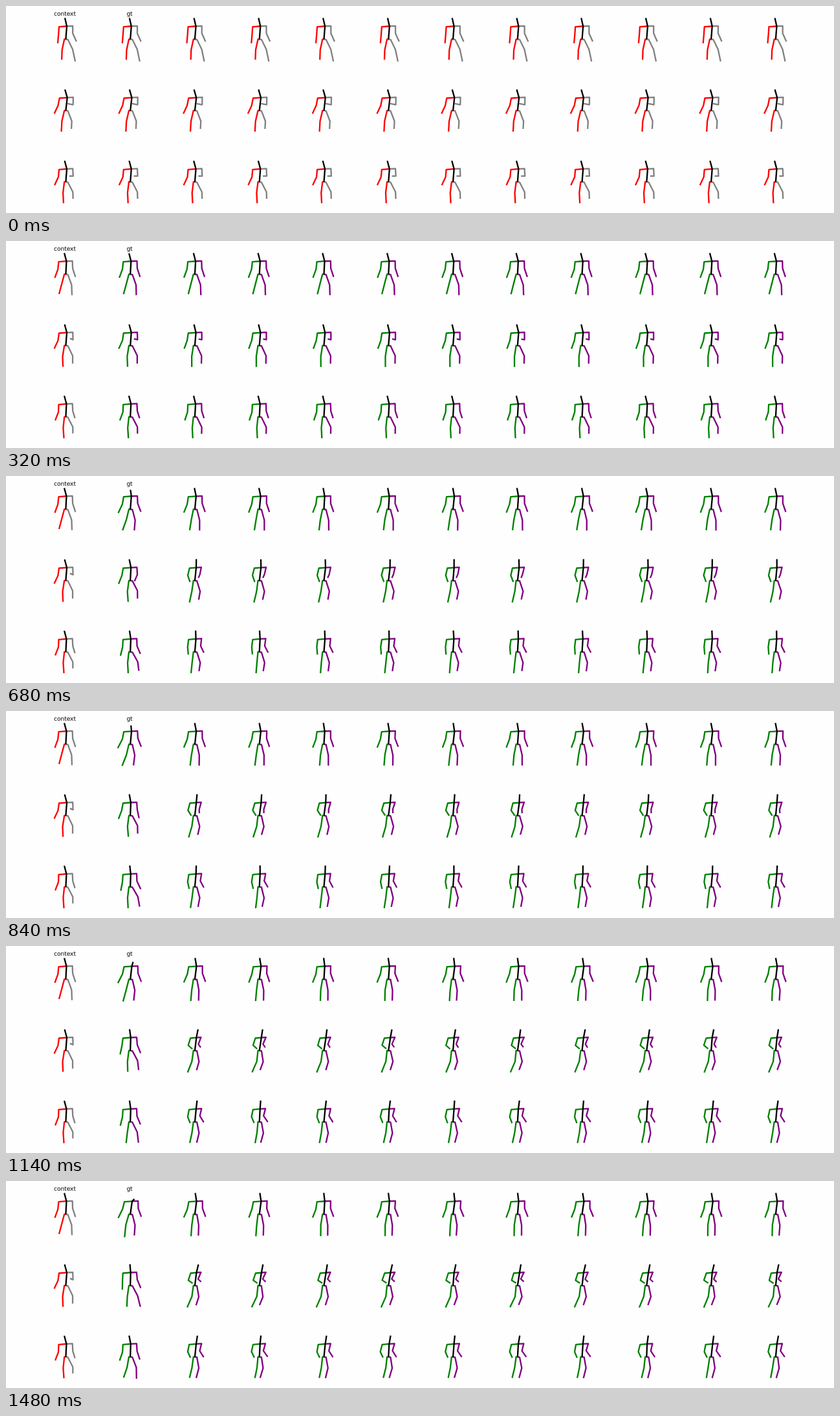
Recreate the animation shown at these times as an HTML page with a canvas. Size 1280 by 320 pixels, loop 1500 ms.

```html
<!DOCTYPE html>
<html lang="en">
<head>
<meta charset="utf-8">
<title>Motion prediction</title>
<style>
  html, body { margin: 0; overflow: hidden; background: #fefefe; }
  canvas { display: block; }
</style>
</head>
<body>
<canvas id="stage" width="1280" height="320"></canvas>
<script>
const LOOP = 1500, STEP = 20, LAST_SEEN = 280, END = LOOP - STEP;
const COLUMNS = 12, PITCH_X = 99.77, PITCH_Y = 110.3;
const BONE = { spine: 20.3, head: 13, arm: [11.5, 14], leg: [17, 16] };

// A pose has a spine [torso, head, head reach, shoulder width] and limbs [upper, lower, lower reach].
// Angles are in degrees from the vertical, positive to the right; reach and width default to 1.
const pose = (spine, armL, armR, legL, legR) => [spine, armL, armR, legL, legR];

const rows = [
  {
    seen: [
      pose([4.5, -13], [-4, -5], [0, 24], [-12, -2, .94], [26, 12, 1.2]),
      pose([3, -15], [-6, -20], [2, 18], [-15, -15, .92], [20, 2])
    ],
    truth: [
      pose([5.5, -5, .66], [-11, -28, 1.13], [3, 22], [-13, -22, 1.14], [12, -8]),
      pose([8, 45, .38], [-14, -26, 1.1], [1, 20], [-16, -6, 1.2], [14, -4])
    ],
    guess: [pose([6, -8], [-10, -21], [-2, 20], [-9, -2, 1.07], [10, -2])]
  },
  {
    seen: [
      pose([6.5, -16], [-11, -25], [-1, -101, .63], [-13, -3], [21, -3, .75]),
      pose([4.5, -15], [-8, -25], [2, -113, .36], [-9, 2], [26, 0, .75])
    ],
    truth: [
      pose([2, -10], [-11, -20], [4, 21], [-7, 5], [28, 1, .78]),
      pose([1.5, -5], [-3, -1], [5, 23], [-8, -3], [28, 14, 1.12])
    ],
    guess: [pose([6.7, 11, 1, .75], [-17, 56, .58], [-24, 47, .45], [-7, -24, 1.15], [10, -20, .87])]
  },
  {
    seen: [
      pose([4.5, -15], [-5, -25], [3, -90, .43], [-7, 3], [27, 2, .66]),
      pose([3, -15], [-2, -21], [3, 17, .82], [-6, 4], [27, 0, .62])
    ],
    truth: [
      pose([1.7, -6], [-4, -10], [2, 26], [-7, 3], [30, 11]),
      pose([1.7, -11], [-3, -19], [3, 18], [-10, -19], [21, 1, 1.09])
    ],
    guess: [pose([4.3, 8, 1, .9], [-12, 25, .72], [-15, 34, .83], [-7, -12], [9, -15])]
  }
];

const ctx = document.getElementById('stage').getContext('2d');

const easeOut = p => 1 - (1 - p) ** 2;
const noise = seed => { const v = Math.sin(seed * 127.1) * 43758.5; return (v - Math.floor(v)) * 2 - 1; };

const mix = (a, b, k) => a.map((part, p) => [0, 1, 2, 3].map(i => {
  const from = part[i] ?? 1, to = b[p][i] ?? 1;
  return from + (to - from) * k;
}));

function along(poses, progress) {
  const place = progress * (poses.length - 1);
  const i = Math.min(Math.floor(place), poses.length - 2);
  return mix(poses[i], poses[i + 1], place - i);
}

// Varies the angles a little, so that every predicted figure differs.
const vary = (parts, seed, amount) => parts.map((part, p) =>
  part.map((v, i) => i < 2 ? v + noise(seed * 10 + p * 2 + i) * amount : v));

function step([x, y], degrees, length) {
  const a = degrees * Math.PI / 180;
  return [x + Math.sin(a) * length, y + Math.cos(a) * length];
}

function line(color, ...points) {
  ctx.strokeStyle = color;
  ctx.beginPath();
  points.forEach(point => ctx.lineTo(...point));
  ctx.stroke();
}

function limb(color, root, joint, [upper, lower, reach], bones) {
  const middle = step(joint, upper, bones[0]);
  line(color, root, joint, middle, step(middle, lower, bones[1] * reach));
}

function drawFigure(x, y, [spine, armL, armR, legL, legR], left, right) {
  const [torso, head, headReach, width] = spine;
  const pelvis = [92.4, 51.5];
  const neck = step(pelvis, 180 - torso, BONE.spine);
  ctx.save();
  ctx.translate(x, y);
  limb(left, neck, [neck[0] - 12 * width, 32.2], armL, BONE.arm);
  limb(right, neck, [neck[0] + 9.2 * width, 30.8], armR, BONE.arm);
  limb(left, pelvis, [90.2, 51.4], legL, BONE.leg);
  limb(right, pelvis, [95.6, 51.8], legR, BONE.leg);
  line('black', step(neck, 180 - head, BONE.head * headReach), neck, pelvis);
  ctx.restore();
}

function draw(now) {
  const time = Math.floor(now % LOOP / STEP) * STEP;
  const past = Math.min(time / LAST_SEEN, 1);
  const future = Math.max(0, (time - LAST_SEEN) / (END - LAST_SEEN));

  ctx.fillStyle = '#fefefe';
  ctx.fillRect(0, 0, 1280, 320);
  ctx.fillStyle = 'black';
  ctx.font = '9px "DejaVu Sans", sans-serif';
  ctx.textAlign = 'center';
  ctx.fillText('context', 91, 15);
  ctx.fillText('gt', 191, 15);
  ctx.lineWidth = 2.3;
  ctx.lineJoin = 'round';

  rows.forEach(({ seen, truth, guess }, row) => {
    const context = along(seen, past);
    const actual = future ? along([seen[1], ...truth], future) : context;
    const predicted = future ? along([seen[1], ...guess], easeOut(future)) : context;
    for (let col = 0; col < COLUMNS; col++) {
      const figure = col === 0 ? context : col === 1 ? actual
        : vary(predicted, row * COLUMNS + col, 2.5 * easeOut(future));
      const colors = col && future ? ['green', 'purple'] : ['red', 'gray'];
      drawFigure(col * PITCH_X, row * PITCH_Y, figure, ...colors);
    }
  });
  requestAnimationFrame(draw);
}
requestAnimationFrame(draw);
</script>
</body>
</html>
```
